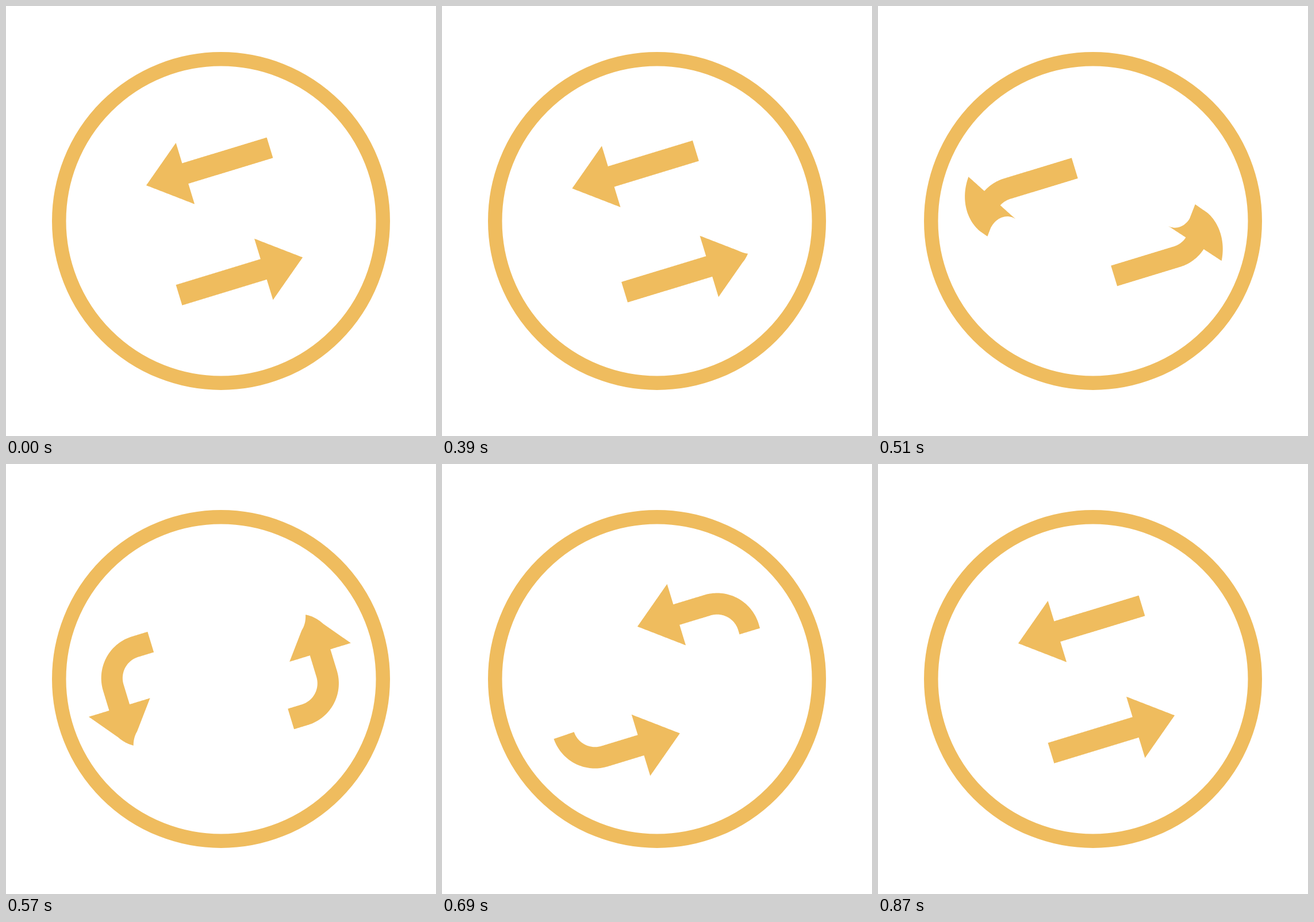
An HTML page with a canvas for the animation above (1.2 s loop, 748 by 748 pixels).

```html
<!DOCTYPE html>
<html lang="en">
<head>
<meta charset="utf-8">
<title>Circling arrows</title>
<style>
  html, body { margin: 0; width: 100%; height: 100%; overflow: hidden; background: #fff; }
  canvas { display: block; }
</style>
</head>
<body>
<canvas id="stage" width="748" height="748"></canvas>
<script>
const ctx = document.getElementById("stage").getContext("2d");
const COLOR = "#efbc5e";
const LOOP = 1200, STEP = 30, STEPS = 19, HOLD = 300;

// Rounded rectangle track: straight lengths, corner radius and corner arc length.
const WIDTH = 248, SIDE = 85.2, RADIUS = 57, ARC = RADIUS * Math.PI / 2;
const HALF = WIDTH + SIDE + 2 * ARC;
const TILT = -Math.atan2(65.5, 215);

// Start and end of each arrow tip, measured along the track.
const TOP_TIP = 227.8, BOTTOM_TIP = 756.2;
const ROUTES = [[TOP_TIP, BOTTOM_TIP], [BOTTOM_TIP, TOP_TIP + 2 * HALF]];

// Arrow outline: distance from the tip along the track, offset across it.
const ARROW = [
  [0, 0], [-70.9, 55.7], [-70.9, 18.6], [-224.8, 18.6],
  [-224.8, -18.6], [-70.9, -18.6], [-70.9, -55.7]
];

// Point on the track, moved inwards by offset; the second half mirrors the first.
function trackPoint(distance, offset) {
  let d = distance % (2 * HALF);
  const flip = d < HALF ? 1 : -1;
  d %= HALF;
  const r = RADIUS - offset;
  let x, y;
  if (d < WIDTH) {
    x = WIDTH / 2 - d;
    y = -SIDE / 2 - r;
  } else if ((d -= WIDTH) < ARC) {
    x = -WIDTH / 2 - r * Math.sin(d / RADIUS);
    y = -SIDE / 2 - r * Math.cos(d / RADIUS);
  } else if ((d -= ARC) < SIDE) {
    x = -WIDTH / 2 - r;
    y = -SIDE / 2 + d;
  } else {
    d -= SIDE;
    x = -WIDTH / 2 - r * Math.cos(d / RADIUS);
    y = SIDE / 2 + r * Math.sin(d / RADIUS);
  }
  return [x * flip, y * flip];
}

// Cubic Bezier easing with handles (0.524, 0) and (0.528, 1).
function ease(x) {
  let low = 0, high = 1;
  for (let i = 0; i < 30; i++) {
    const s = (low + high) / 2, q = 1 - s;
    if (3 * 0.524 * s * q * q + 3 * 0.528 * s * s * q + s ** 3 < x) low = s;
    else high = s;
  }
  return low * low * (3 - 2 * low);
}

function drawArrow(tip) {
  ctx.beginPath();
  ARROW.forEach(([x, y], i) => {
    const [nextX, nextY] = ARROW[(i + 1) % ARROW.length];
    const pieces = Math.ceil(Math.hypot(nextX - x, nextY - y) / 2);
    for (let j = 0; j < pieces; j++) {
      const k = j / pieces;
      ctx.lineTo(...trackPoint(tip + x + (nextX - x) * k, y + (nextY - y) * k));
    }
  });
  ctx.closePath();
  ctx.fill();
}

function draw() {
  const time = performance.now() % LOOP;
  const step = Math.min(STEPS, Math.max(0, Math.floor((time - HOLD) / STEP)));
  const progress = step === STEPS ? 1 : ease(step / STEPS);

  ctx.fillStyle = "#fff";
  ctx.fillRect(0, 0, 748, 748);
  ctx.fillStyle = ctx.strokeStyle = COLOR;
  ctx.lineWidth = 24.5;
  ctx.beginPath();
  ctx.arc(374, 374, 281.75, 0, 2 * Math.PI);
  ctx.stroke();

  ctx.save();
  ctx.translate(372.3, 377);
  ctx.rotate(TILT);
  for (const [from, to] of ROUTES) drawArrow(from + (to - from) * progress);
  ctx.restore();
  requestAnimationFrame(draw);
}
draw();
</script>
</body>
</html>
```
